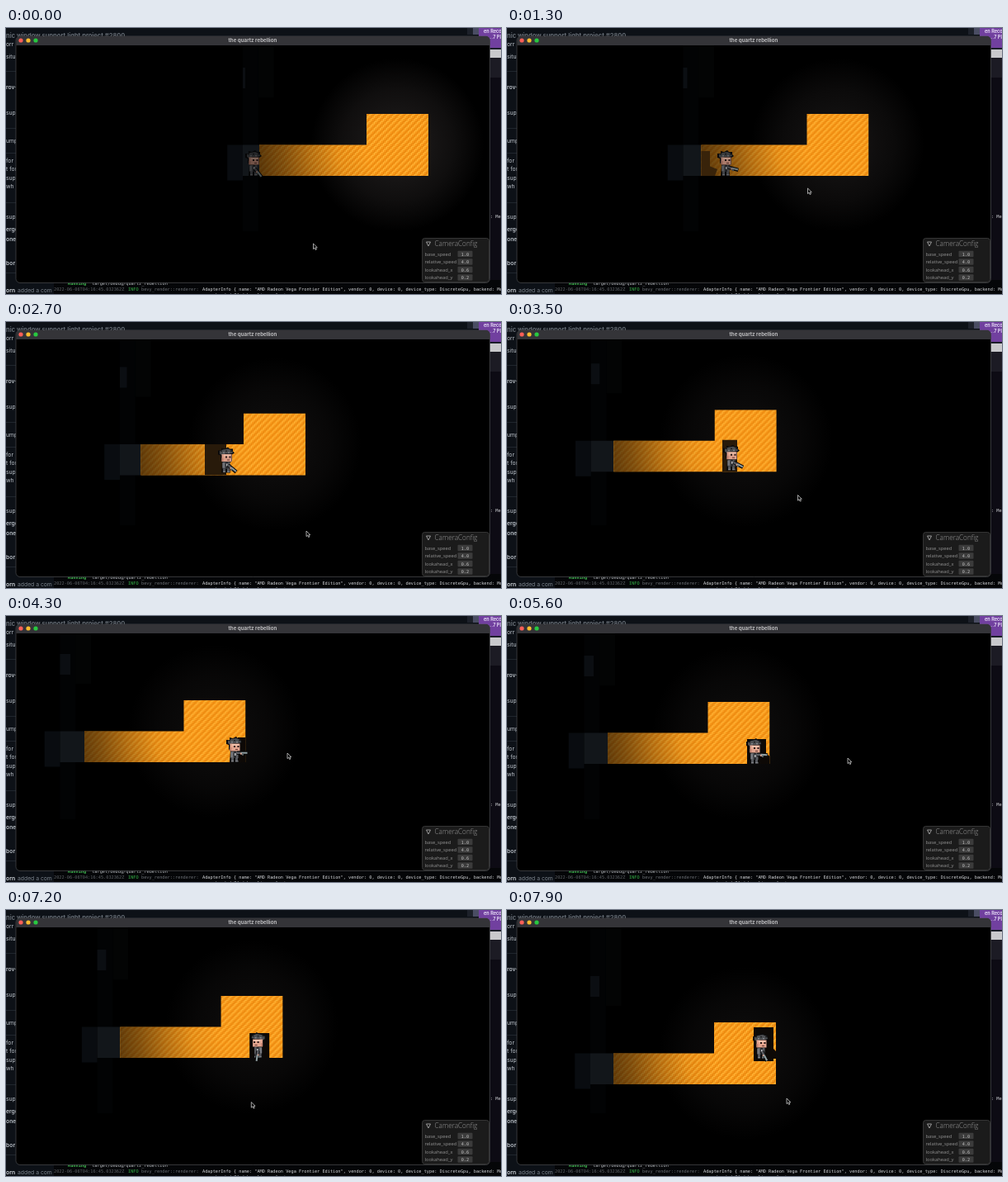
Animation of 600x322 px, one loop 8000 ms. Source, as an HTML page with a canvas:

```html
<!DOCTYPE html>
<html lang="en">
<head>
<meta charset="utf-8">
<title>Lava corridor</title>
<style>
html, body { margin: 0; width: 100%; height: 100%; overflow: hidden; background: #000; }
canvas { display: block; width: 600px; height: 322px; }
</style>
</head>
<body>
<canvas id="stage" width="600" height="322"></canvas>
<script>
const stage = document.getElementById('stage');
const ctx = stage.getContext('2d');
const LOOP = 8000, STEP = 100, TILE = 37.5, HALF = TILE / 2;
const UI = 'Inter, "Open Sans", sans-serif';
const MONO = '"DejaVu Sans Mono", monospace';

// time, room right edge, room top, lava start, player x, height above floor,
// cursor x and y, shadow left and right from the player, light on the player
const fields = ['time', 'right', 'top', 'start', 'x', 'lift', 'mx', 'my', 'sh1', 'sh2', 'light'];
const keys = [
  [0,    512,   104,   307,   300, 0,  372.5, 261, -30, 7,   .5],
  [1300, 438.5, 104,   235.5, 265, 0,  364.5, 194, -43, -19, .75],
  [2700, 363,   110.5, 163.5, 267, 3,  364,   253, -26, 0,   .95],
  [4300, 290.5, 102,   95,    277, 0,  341,   166, 4,   14,  1],
  [5600, 318.5, 104,   122,   300, 0,  413,   172, -9,  14,  1],
  [6400, 346,   104,   148,   304, 0,  246.5, 239, -12, 12,  1],
  [7400, 333,   104,   136,   306, 0,  310,   231, -10, 14,  1],
  [7900, 326,   136,   129,   308, 31, 339,   228, -9,  15,  1]
];

function poseAt(time) {
  let i = 0;
  while (i < keys.length - 2 && time >= keys[i + 1][0]) i++;
  const a = keys[i], b = keys[i + 1];
  const k = Math.min(1, (time - a[0]) / (b[0] - a[0]));
  return Object.fromEntries(fields.map((name, n) => [name, a[n] + (b[n] - a[n]) * k]));
}

function box(g, color, x, y, w, h) {
  g.fillStyle = color;
  g.fillRect(x, y, w, h);
}

function poly(g, color, ...points) {
  g.beginPath();
  points.forEach(([x, y]) => g.lineTo(x, y));
  g.closePath();
  g.fillStyle = color;
  g.fill();
}

function label(g, str, x, y, font, color, align = 'left') {
  g.font = font;
  g.fillStyle = color;
  g.textAlign = align;
  g.fillText(str, x, y);
}

function round(g, color, x, y, w, h, r, line) {
  g.beginPath();
  g.roundRect(x, y, w, h, r);
  g.fillStyle = color;
  g.fill();
  if (line) {
    g.strokeStyle = line;
    g.lineWidth = .7;
    g.stroke();
  }
}

function layer(w, h, paint) {
  const c = document.createElement('canvas');
  c.width = w;
  c.height = h;
  paint(c.getContext('2d'));
  return c;
}

// Diagonal lattice of scales, lit from the upper left
const lava = ctx.createPattern(layer(15, 15, g => {
  box(g, '#f8981a', 0, 0, 15, 15);
  g.lineWidth = 1.2;
  const arc = (color, x, y, from) => {
    g.strokeStyle = color;
    g.beginPath();
    g.arc(x, y, 2, from * Math.PI, (from + .9) * Math.PI);
    g.stroke();
  };
  for (let row = -1; row < 6; row++) {
    for (let col = -1; col < 4; col++) {
      const x = col * 7.5 + (row & 1) * 3.75, y = row * 3.75;
      arc('#ffb538', x, y, .8);
      arc('#e8870e', x, y, -.2);
    }
  }
}), 'repeat');

const desktop = layer(600, 322, g => {
  box(g, '#0d1117', 0, 0, 600, 322);
  label(g, 'nic window support light project #2800', 0, 12, `600 7.6px ${UI}`, '#6d747c');
  for (const y of [52, 121, 151, 211, 296]) box(g, '#20262e', 0, y, 12, 1);
  const lines = [['orr', 22], ['situ', 37], ['rov-', 74, 600], ['sup', 105], ['ump', 139],
    ['for', 163], ['t for', 173], ['sup', 184], ['wh', 194], ['sup', 231],
    ['erge', 246, 600], ['one', 258, 600], ['bor', 287, 600]];
  for (const [str, y, weight = 400] of lines) label(g, str, 0, y, `${weight} 6.8px ${UI}`, '#b9bfc6');
  label(g, 'orn', 0, 319.5, `600 6.8px ${UI}`, '#d0d5db');
  label(g, 'added a com', 14, 319.5, `6.8px ${UI}`, '#7b838c');

  box(g, '#050608', 58, 305, 542, 17);
  const mono = `5.25px ${MONO}`;
  label(g, 'Running', 75, 311, `bold ${mono}`, '#3fb950');
  label(g, '`target/debug/quartz_rebellion`', 101, 311, mono, '#b9bcc0');
  label(g, '2022-06-06T04:16:45.032362Z', 58, 318, mono, '#5f6368');
  label(g, 'INFO', 148, 318, mono, '#35b548');
  label(g, 'bevy_render::renderer:', 164, 318, mono, '#6c7076');
  label(g, 'AdapterInfo { name: "AMD Radeon Vega Frontier Edition", vendor: 0, device: 0, device_type: DiscreteGpu, backend: Me', 238, 318, mono, '#d4d6d9');
  label(g, 'Loaded 74 debug lines plugin', 254, 324.5, mono, '#b9bcc0');

  box(g, '#1d212a', 559, 0, 7, 8);
  box(g, '#4a4d63', 566, 0, 7, 8);
  box(g, '#71409f', 573, 0, 27, 24);
  label(g, 'en Reco', 579, 6, `600 5.6px ${UI}`, '#f2eaff');
  label(g, '...7 Pl', 585, 13, `600 5.6px ${UI}`, '#f2eaff');
  box(g, '#1b1d29', 586, 24, 14, 281);
  box(g, '#c9c9cc', 586, 26, 14, 10);
  box(g, '#1c1b24', 586, 36, 14, 24);
  box(g, '#0d0b14', 586, 60, 14, 245);
  label(g, ': Me', 587, 230, mono, '#d4d6d9');
});

const panel = layer(600, 322, g => {
  round(g, '#1b1b1b', 504.5, 254.5, 81, 53, 3, '#454545');
  poly(g, '#1b1b1b', [509.5, 259], [514.5, 259], [512, 264]);
  g.strokeStyle = '#b5b5b5';
  g.lineWidth = .8;
  g.stroke();
  label(g, 'CameraConfig', 519.5, 264, '300 8.2px "Open Sans", sans-serif', '#9b9b9b');
  [['base_speed', '1.0'], ['relative_speed', '4.0'], ['lookahead_x', '0.6'], ['lookahead_y', '0.2']]
    .forEach(([name, value], i) => {
      const y = 275.5 + i * 9.5;
      label(g, name, 507.5, y, '5.8px "Open Sans", sans-serif', '#929292');
      round(g, '#3b3b3b', 547.5, y - 5.8, 18, 7.6, 1);
      label(g, value, 556.5, y, `5.2px ${MONO}`, '#c2c2c2', 'center');
    });
});

function drawWall(p) {
  const x = p.right - 13 * HALF, y = p.top + TILE, col = x + HALF;
  box(ctx, '#020304', col, 21, HALF, 225);
  box(ctx, '#030404', col + HALF, 21, HALF, p.top - 41);
  box(ctx, '#0b0e12', col, p.top - 56, Math.max(3, p.start - 17 - col), 25);
  box(ctx, '#090c10', x, y, HALF, 43);
  box(ctx, '#12161a', col, y, p.start - col, TILE);
}

function drawLava(p) {
  const floor = p.top + 2 * TILE, left = p.right - 2 * TILE;
  const cx = p.right - TILE, cy = p.top + TILE;

  // The glow fades as the player comes near
  const glow = .13 + (1 - p.light) * .3;
  const halo = ctx.createRadialGradient(cx, cy, 30, cx, cy, 105);
  halo.addColorStop(0, `rgba(92,84,84,${glow})`);
  halo.addColorStop(.5, `rgba(92,84,84,${glow * .6})`);
  halo.addColorStop(1, 'rgba(92,84,84,0)');
  box(ctx, halo, cx - 110, cy - 110, 220, 220);

  const room = new Path2D();
  room.rect(left, p.top, 2 * TILE, 2 * TILE);
  room.rect(p.start, cy, left - p.start, TILE);
  ctx.save();
  ctx.clip(room);
  ctx.translate(p.right, p.top);
  box(ctx, lava, -260, 0, 260, 80);
  ctx.translate(-p.right, -p.top);

  const shade = ctx.createRadialGradient(cx, cy, 40, cx, cy, 172);
  shade.addColorStop(0, 'rgba(12,6,0,0)');
  shade.addColorStop(.25, 'rgba(12,6,0,.07)');
  shade.addColorStop(.5, 'rgba(12,6,0,.27)');
  shade.addColorStop(.75, 'rgba(12,6,0,.5)');
  shade.addColorStop(1, 'rgba(12,6,0,.68)');
  box(ctx, shade, p.start, p.top, p.right - p.start, 80);

  // Shadow of the player, then of the raised arm
  const feet = floor - p.lift, dark = p.light < .8 ? '#38230a' : p.light < 1 ? '#281a0a' : '#0d0906';
  const high = p.light < 1 && p.light > .85 ? 37 : p.lift > 3 ? 38 : 30;
  box(ctx, dark, p.x + p.sh1, feet - high, p.sh2 - p.sh1, high + Math.min(p.lift, 3));
  if (p.x > p.right - 30) {
    poly(ctx, '#0d0906', [p.x + 4, feet - 13], [p.x + 14, feet - 13], [p.right, feet - 9], [p.right, feet], [p.x + 4, feet]);
  } else if (p.light < .85) {
    poly(ctx, dark, [p.x - 20, feet - 12], [p.x - 10, feet - 8], [p.x - 13, feet], [p.x - 20, feet]);
  }
  ctx.restore();
}

function drawPlayer(p) {
  const feet = p.top + 2 * TILE - p.lift;
  const angle = Math.atan2(p.my - feet + 12, p.mx - p.x);
  ctx.save();
  ctx.translate(p.x, feet - 30);
  ctx.filter = `brightness(${p.light})`;
  ctx.save();
  if (p.mx < p.x) ctx.scale(-1, 1);
  const dot = (color, x, y, w, h) => box(ctx, color, x, y, w, h);
  poly(ctx, '#0b0b0c', [-10, 3], [-6, 3], [-6, 0], [-2, 1], [2, -1], [4, 1], [8, 1], [8, 4], [10, 6],
    [7, 8], [7, 16], [4, 18], [5, 30], [-6, 30], [-5, 17], [-7, 14], [-7, 9], [-10, 8]);
  poly(ctx, '#4d4f52', [-8, 4], [-4, 2], [2, 1], [7, 3], [8, 6], [4, 7], [-1, 7], [-5, 9], [-8, 7]);
  for (let i = 0; i < 5; i++) dot(i % 2 ? '#85878b' : '#1d1e20', -7 + i * 3, 3 + i % 2 * 2, 2, 1.3);
  dot('#e3a58f', -5.5, 7.5, 12, 9);
  dot('#f4c2ad', -3, 8, 8, 2);
  dot('#2a1a18', -1, 10, 2, 2);
  dot('#2a1a18', 3.5, 10, 2, 2);
  dot('#c98673', -5.5, 12, 2, 4);
  dot('#6b3a32', 1, 14, 3, 1);
  dot('#5b5d62', -4.5, 17, 9, 8);
  dot('#2c2e32', -1, 17, 3, 8);
  dot('#c4c5c7', 0, 19, 1.5, 3);
  dot('#7c7e83', -4.5, 18, 2, 6);
  dot('#55575c', -4, 25, 3, 4);
  dot('#55575c', 1, 25, 3, 4);
  dot('#7c7e83', -4, 28, 3, 1.5);
  dot('#7c7e83', 1, 28, 3.5, 1.5);
  ctx.restore();

  ctx.translate(0, 18.5);
  ctx.rotate(angle);
  if (Math.abs(angle) > Math.PI / 2) ctx.scale(1, -1);
  dot('#0b0b0c', 3, -2, 13, 4.5);
  dot('#5b5d62', 3, -1, 5, 2.5);
  dot('#e3a58f', 7, 0, 2, 2);
  dot('#93a2a4', 8, -1, 7.5, 2);
  dot('#5b6668', 9, 1, 2, 2);
  ctx.restore();
}

function drawCursor({ mx, my }) {
  poly(ctx, '#050505', [mx, my], [mx, my + 6.6], [mx + 1.6, my + 5.2], [mx + 2.7, my + 7.6],
    [mx + 3.9, my + 7], [mx + 2.8, my + 4.8], [mx + 4.8, my + 4.7]);
  ctx.strokeStyle = '#e4e4e4';
  ctx.lineWidth = .7;
  ctx.stroke();
}

function draw(time) {
  const p = poseAt(time);
  ctx.drawImage(desktop, 0, 0);
  round(ctx, '#000', 12, 10, 574.5, 298.5, 5, '#4b4c50');
  ctx.save();
  ctx.beginPath();
  ctx.roundRect(12.3, 10, 574, 298, 5);
  ctx.clip();
  drawWall(p);
  drawLava(p);
  drawPlayer(p);
  box(ctx, '#343438', 12, 10, 575, 11);
  ['#ff5f57', '#febc2e', '#28c840'].forEach((color, i) => round(ctx, color, 15.4 + i * 9, 12.4, 5.2, 5.2, 2.6));
  label(ctx, 'the quartz rebellion', 299, 17.3, `700 6.2px ${UI}`, '#bcbcbe', 'center');
  ctx.restore();
  ctx.drawImage(panel, 0, 0);
  drawCursor(p);
}

const began = performance.now();
function tick() {
  const time = (performance.now() - began) % LOOP;
  draw(time < 2 * STEP ? 0 : Math.floor(time / STEP) * STEP);
  requestAnimationFrame(tick);
}
tick();
</script>
</body>
</html>
```
